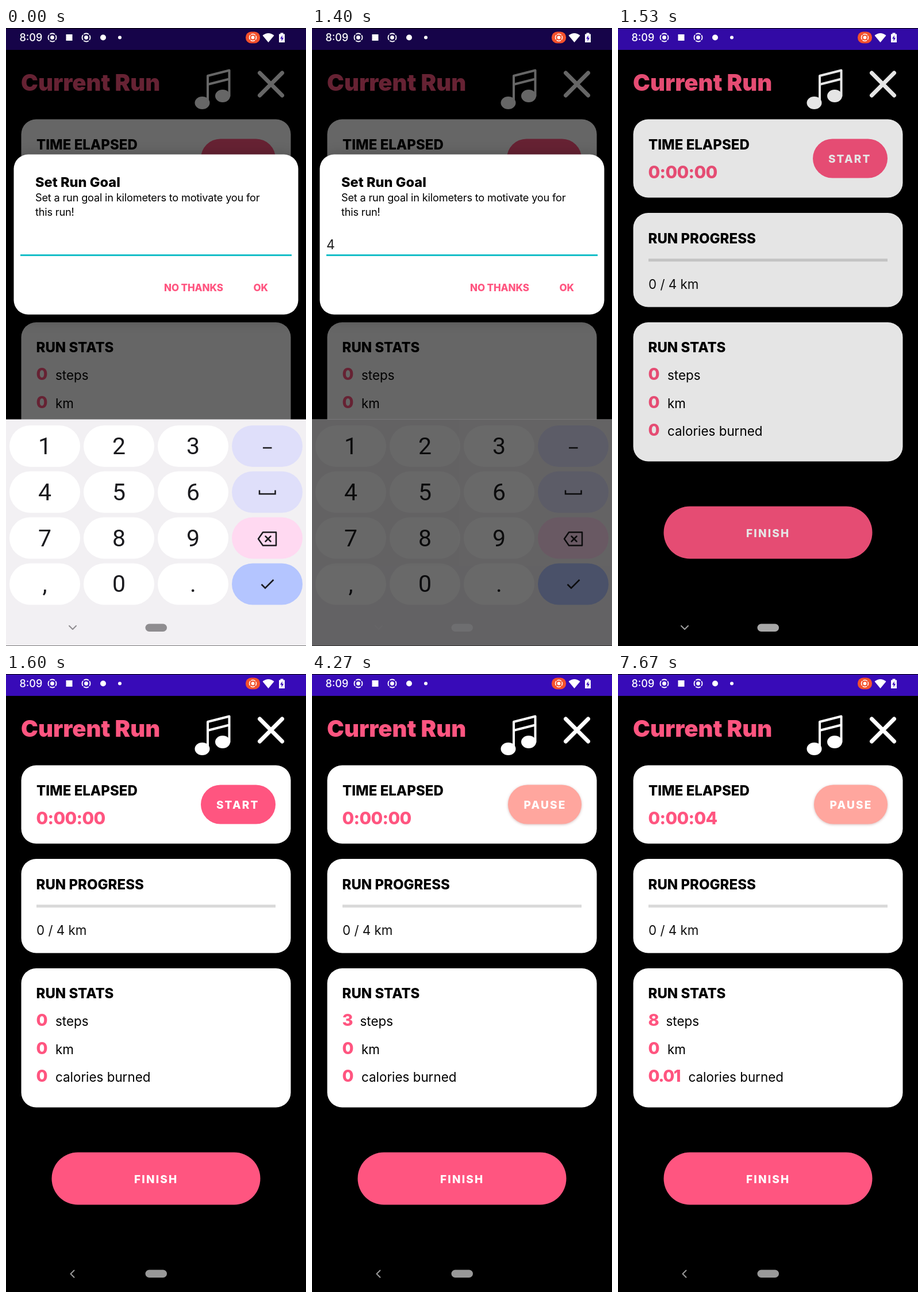
An HTML page that plays this animation: 522x1073 px, repeating every 8000 ms.

```html
<!DOCTYPE html>
<html lang="en">
<head>
<meta charset="utf-8">
<title>Run tracker</title>
<style>
  html, body { margin: 0; width: 100%; height: 100%; overflow: hidden; background: #000; }
  svg { display: block; width: 100vw; height: 100vh; font-family: Inter, Roboto, sans-serif; }
  text { white-space: pre; }
  .pink { fill: #ff5580; }
  .white { fill: #fff; }
  .line { fill: none; stroke-linecap: round; stroke-linejoin: round; }
  .head { font-size: 24px; font-weight: 800; }
  .big { font-size: 30px; font-weight: 800; letter-spacing: -.7px; }
  .num { font-size: 29px; font-weight: 800; letter-spacing: -1.4px; }
  .label { font-size: 22.4px; }
  .btn { font-size: 19px; font-weight: 800; letter-spacing: 2.2px; fill: #fff; }
  .body { font-size: 18.2px; letter-spacing: -.2px; }
  .action { font-size: 17px; font-weight: 800; letter-spacing: -.1px; }
  .digit { font: 41px Roboto, Inter, sans-serif; text-anchor: middle; fill: #1b1b1f; }

  .step { animation: 8s step-end infinite; }
  #dim { animation-name: dim; }
  #dialog { animation-name: dialog; filter: drop-shadow(0 5px 12px rgba(0, 0, 0, .35)); }
  #board { animation-name: board; }
  #shade { animation-name: shade; }
  #key4 { animation-name: press; }
  #typed { animation-name: typed; }
  #cursor { animation-name: cursor; }
  #pill { animation-name: pill; }
  #down { animation-name: down; }
  #back { animation-name: back; }
  #start { animation-name: start; }
  #pause { animation-name: pause; }
  #pause rect { filter: drop-shadow(0 1px 2px rgba(120, 30, 30, .3)); }
  #ripple { transform-box: fill-box; transform-origin: center; animation: ripple 8s linear infinite; }

  @keyframes dim { 0% { opacity: .6 } 18.375% { opacity: .335 } 19.125% { opacity: .1 } 20%, 100% { opacity: 0 } }
  @keyframes dialog { 0% { opacity: 1 } 18.375% { opacity: .1 } 19.125%, 100% { opacity: 0 } }
  @keyframes board { 0% { opacity: 1 } 18.375%, 100% { opacity: 0 } }
  @keyframes shade { 0% { opacity: 0 } 17.5%, 100% { opacity: .59 } }
  @keyframes press { 0% { fill: #fff } 6.625% { fill: #e1e0e4 } 8.375%, 100% { fill: #fff } }
  @keyframes typed { 0% { opacity: 0 } 7.5%, 100% { opacity: 1 } }
  @keyframes cursor { 0% { opacity: 0 } 7.5% { opacity: 1 } 15%, 100% { opacity: 0 } }
  @keyframes pill { 0% { fill: #8f8d90 } 17.5% { fill: #6e6e70 } 18.375% { fill: #a8a8a8 } 20%, 100% { fill: #999 } }
  @keyframes down { 0% { stroke: #8f8d90 } 17.5% { stroke: #666567 } 18.375% { stroke: #a0a0a0 } 20%, 100% { stroke: transparent } }
  @keyframes back { 0% { opacity: 0 } 20%, 100% { opacity: 1 } }
  @keyframes start { 0% { opacity: 1 } 33.375%, 100% { opacity: 0 } }
  @keyframes pause { 0% { opacity: 0 } 33.375%, 100% { opacity: 1 } }
  @keyframes ripple {
    0%, 30.8% { transform: scale(.2); opacity: 0 }
    30.875% { transform: scale(.3); opacity: .24 }
    33.375% { transform: scale(1); opacity: .24 }
    37.5%, 100% { transform: scale(1); opacity: 0 }
  }
</style>
</head>
<body>
<svg viewBox="0 0 522 1073">
  <defs>
    <clipPath id="buttonClip"><rect x="341" y="193" width="128" height="67.5" rx="33.75"/></clipPath>
    <g id="target">
      <circle r="3.4" fill="#fff"/>
      <circle r="7" class="line" stroke="#fff" stroke-width="1.8" stroke-dasharray="8 3" stroke-dashoffset="4"/>
    </g>
  </defs>
  <rect width="522" height="1073"/>

  <!-- run screen -->
  <rect y="1" width="522" height="37" fill="#380bb8"/>
  <text class="pink" x="26" y="109" font-size="40" font-weight="900">Current Run</text>
  <g fill="#fff">
    <ellipse cx="341.5" cy="130" rx="13" ry="11"/>
    <ellipse cx="377" cy="118" rx="13" ry="11"/>
  </g>
  <path class="line" stroke="#fff" stroke-width="4" d="M351 130V83L388.5 73.5V118M351 98L388.5 88.5"/>
  <path class="line" stroke="#fff" stroke-width="7" d="M441.5 78L480.5 117M480.5 78L441.5 117"/>

  <g class="white">
    <rect x="26.5" y="158.5" width="469" height="136" rx="26"/>
    <rect x="26.5" y="321" width="469" height="163.5" rx="26"/>
    <rect x="26.5" y="511" width="469" height="241.5" rx="26"/>
  </g>

  <text class="head" x="53" y="210.5">TIME ELAPSED</text>
  <text class="pink big" id="clock" x="52.5" y="261">0:00:00</text>
  <g id="start" class="step">
    <rect class="pink" x="339" y="192.5" width="130" height="68" rx="34"/>
    <text class="btn" x="366" y="234">START</text>
  </g>
  <g id="pause" class="step">
    <rect x="341" y="192.5" width="128" height="68" rx="34" fill="#ffa69e"/>
    <text class="btn" x="368.5" y="234">PAUSE</text>
  </g>
  <g clip-path="url(#buttonClip)"><circle id="ripple" cx="405" cy="227" r="68" fill="#fff"/></g>

  <text class="head" x="52.5" y="373.5">RUN PROGRESS</text>
  <rect x="53" y="400.5" width="416" height="5" fill="#d9d9d9"/>
  <text class="label" x="53" y="452.5" fill="#111">0 / 4 km</text>

  <text class="head" x="52.5" y="563">RUN STATS</text>
  <text class="pink num" id="steps" x="52.5" y="611">0</text>
  <text class="label" id="stepsLabel" x="86" y="611">steps</text>
  <text class="pink num" x="52.5" y="659.5">0</text>
  <text class="label" x="86" y="659.5">km</text>
  <text class="pink num" id="calories" x="52.5" y="708">0</text>
  <text class="label" id="caloriesLabel" x="86" y="708">calories burned</text>

  <rect class="pink" x="79.5" y="830.5" width="363" height="91" rx="45.5"/>
  <text class="btn" x="223" y="884">FINISH</text>

  <rect id="dim" class="step" width="522" height="1073"/>

  <!-- status icons -->
  <g class="white">
    <text x="23.5" y="23" font-size="18" font-weight="500">8:09</text>
    <use href="#target" x="80.5" y="16.5"/>
    <rect x="104.5" y="11" width="11" height="11"/>
    <use href="#target" x="139.5" y="16.5"/>
    <circle cx="169" cy="16.5" r="5"/>
    <circle cx="198" cy="16.5" r="3"/>
    <rect x="417" y="6.5" width="25" height="20" rx="9.5" fill="#f4512c"/>
    <use href="#target" transform="translate(429.5 16.5) scale(.85)"/>
    <path d="M446.5 13Q456.5 5 466.5 13L456.5 25Z"/>
    <path d="M477.5 10.5V8.5H482.5V10.5H485V25H475V10.5Z"/>
    <path d="M481 12.5L477 18.5H479.5V23L483 17H480.5Z" fill="#380bb8"/>
  </g>

  <!-- goal dialog -->
  <g id="dialog" class="step">
    <rect class="white" x="13.5" y="219.5" width="495" height="278" rx="25"/>
    <text x="51" y="276" font-size="23.6" font-weight="800">Set Run Goal</text>
    <text class="body" x="51" y="301">Set a run goal in kilometers to motivate you for</text>
    <text class="body" x="51" y="326">this run!</text>
    <text id="typed" class="step" x="25" y="384" font-size="23" fill="#222">4</text>
    <rect id="cursor" class="step" x="39" y="360" width="2" height="29" fill="#16bec8"/>
    <rect x="25" y="393" width="472" height="3" fill="#16bec8"/>
    <text class="pink action" x="275" y="457">NO THANKS</text>
    <text class="pink action" x="430.5" y="457">OK</text>
  </g>

  <!-- keyboard -->
  <g id="board" class="step">
    <rect y="679.5" width="522" height="393" fill="#f2f0f3"/>
    <g id="keys"></g>
    <g class="line" stroke="#1b1b1f" stroke-width="2.5">
      <path d="M447 729H462.5" stroke-linecap="butt"/>
      <path d="M441 802.5V809H468.5V802.5" stroke-linecap="butt" stroke-linejoin="miter"/>
      <path d="M447 875.5H470V898.5H447L439 887ZM451.5 882.5L460.5 891.5M460.5 882.5L451.5 891.5"/>
      <path d="M444.5 966L451 972.5L465.5 958" stroke-linecap="butt" stroke-linejoin="miter"/>
    </g>
    <rect id="shade" class="step" y="679.5" width="522" height="393.5"/>
  </g>

  <!-- navigation -->
  <rect id="pill" class="step" x="242.5" y="1034.5" width="37.5" height="13.5" rx="6.75"/>
  <path id="down" class="step line" stroke-width="2" d="M110 1038L116 1044L122 1038"/>
  <path id="back" class="step line" stroke="#999" stroke-width="2" d="M118.5 1035.5L112.5 1041.5L118.5 1047.5"/>
</svg>
<script>
  const LOOP = 8000;
  const $ = id => document.getElementById(id);

  function add(parent, tag, attrs, content = '') {
    const el = document.createElementNS('http://www.w3.org/2000/svg', tag);
    for (const name in attrs) el.setAttribute(name, attrs[name]);
    el.textContent = content;
    parent.append(el);
    return el;
  }

  const sideFills = ['#dfdffa', '#dfdffa', '#ffd9f1', '#b4c5ff'];
  ['123', '456', '789', ',0.'].forEach((row, r) => {
    const y = 690 + r * 79.8;
    for (let c = 0; c < 4; c++) {
      const x = 6 + c * 129;
      const key = add($('keys'), 'rect', {
        x, y, width: 123, height: 72, rx: 36, fill: c < 3 ? '#fff' : sideFills[r]
      });
      if (row[c] === '4') {
        key.id = 'key4';
        key.classList.add('step');
      }
      if (c < 3) add($('keys'), 'text', { class: 'digit', x: x + 61.5, y: y + 50 }, row[c]);
    }
  });

  // The step count equals the number of marks already passed.
  const stepTimes = [3600, 3800, 4270, 4800, 5200, 5800, 6870, 7400];
  const labelX = { 0: 86, 1: 79, '0.01': 122.5 };

  function setStat(id, value) {
    $(id).textContent = value;
    $(id + 'Label').setAttribute('x', labelX[value] ?? 83.5);
  }

  function render(t) {
    const seconds = Math.max(0, Math.floor((t - 3400) / 1000));
    $('clock').textContent = '0:00:0' + seconds;
    setStat('steps', stepTimes.filter(mark => t >= mark).length);
    setStat('calories', t < 5400 ? '0' : '0.01');
  }

  let origin;
  function tick(now) {
    origin ??= now;
    render((now - origin) % LOOP);
    requestAnimationFrame(tick);
  }
  requestAnimationFrame(tick);
</script>
</body>
</html>
```
